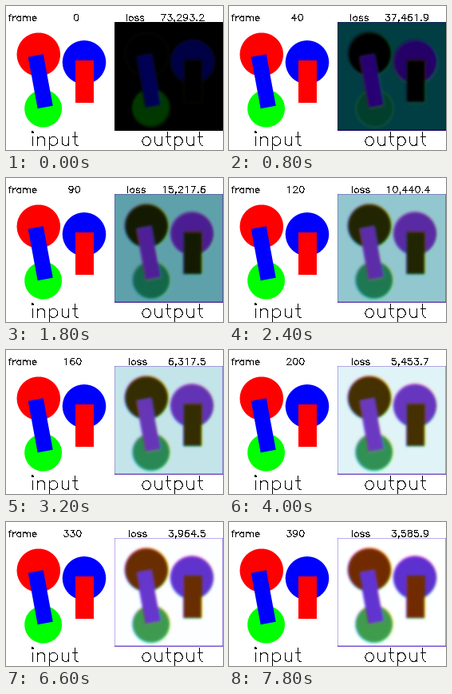
These frames come from a looping animation (272x180 px, 8000 ms). A matplotlib script:

```python
import numpy as np
import matplotlib.pyplot as plt
from matplotlib.animation import FuncAnimation

W, H, SIDE, TOP = 272, 180, 136, 20
FRAMES, STEP_MS = 40, 200


# ---- single-stroke lettering: baseline 0, capitals 21, lower case 14 ----
def arc(cx, cy, rx, ry, a0=0, a1=360):
    t = np.radians(np.linspace(a0, a1, max(5, int(abs(a1 - a0) / 22.5) + 1)))
    return [(cx + rx * np.cos(a), cy + ry * np.sin(a)) for a in t]


def turn(strokes, w, h):
    return [[(w - x, h - y) for x, y in s] for s in strokes]


def hump(dx=0):
    return arc(9.5 + dx, 9, 5.5, 5, 165, 0) + [(15 + dx, 0)]


stem = [(4, 14), (4, 0)]
bar = [(2, 14), (9, 14)]
dot = arc(5, 1, 1, 1)
six = [arc(11.5, 10.5, 7.5, 10.5, 55, 180) + [(4, 7)], arc(10.5, 6.5, 6.5, 6.5)]

GLYPHS = {
    " ": (16, []),
    ".": (10, [dot]),
    ",": (10, [dot, [(6, 1), (4, -4)]]),
    "0": (20, [arc(10, 10.5, 7, 10.5)]),
    "1": (20, [[(6, 17), (11, 21), (11, 0)]]),
    "2": (20, [arc(10, 15, 6, 6, 170, -20) + [(3, 0), (17, 0)]]),
    "3": (20, [[(5, 21), (16, 21), (10, 13)] + arc(10, 6.5, 7, 6.5, 80, -158)]),
    "4": (20, [[(13, 0), (13, 21), (3, 7), (18, 7)]]),
    "5": (20, [[(15, 21), (5, 21), (4, 12)] + arc(10, 7, 7, 7, 130, -155)]),
    "6": (20, six),
    "7": (20, [[(3, 21), (17, 21), (7, 0)]]),
    "8": (20, [arc(10, 16.5, 6, 4.5), arc(10, 6, 7, 6)]),
    "9": (20, turn(six, 20, 21)),
    "a": (19, [[(15, 14), (15, 0)], arc(9.5, 7, 6.5, 7, 35, 325)]),
    "e": (18, [[(3, 8), (15, 8)] + arc(9, 7, 6, 7, 25, 325)]),
    "f": (12, [arc(10, 16, 5, 5, 90, 180) + [(5, 0)], bar]),
    "i": (8, [arc(4, 21, 1, 1), stem]),
    "l": (8, [[(4, 21), (4, 0)]]),
    "m": (30, [stem, hump(), hump(11)]),
    "n": (19, [stem, hump()]),
    "o": (19, [arc(9.5, 7, 6.5, 7)]),
    "p": (19, [[(4, 14), (4, -7)], arc(9.5, 7, 6.5, 7, 145, -145)]),
    "r": (13, [stem, arc(12, 7, 8, 7, 172, 90)]),
    "s": (17, [arc(8.5, 10.6, 5.5, 3.4, 20, 270) + arc(8.5, 3.6, 5.5, 3.6, 90, -160)]),
    "t": (12, [[(5, 21)] + arc(10, 5, 5, 5, 180, 270), bar]),
    "u": (19, turn([stem, hump()], 19, 14)),
}


def write(img, text, x, y, size):
    for ch in text:
        width, strokes = GLYPHS[ch]
        for s in strokes:
            p = np.array(s, float) * (size, -size) + (x, y)
            for a, b in zip(p[:-1], p[1:]):
                n = int(np.ceil(np.abs(b - a).max())) + 1
                q = np.rint(np.linspace(a, b, n + 1)).astype(int)
                q = q[(q[:, 0] >= 0) & (q[:, 0] < W) & (q[:, 1] >= 0) & (q[:, 1] < H)]
                img[q[:, 1], q[:, 0]] = 0
        x += width * size


# ---- scene: coverage of each region over one panel ----
BG, RED, GREEN, DISC, BLOCK = range(5)
SUB = 4
yy, xx = (np.mgrid[:SIDE * SUB, :SIDE * SUB] + 0.5) / SUB
yy += TOP


def disc(cx, cy, r):
    return (xx - cx) ** 2 + (yy - cy) ** 2 <= r * r


def box(cx, cy, hw, hh, deg=0):
    c, s = np.cos(np.radians(deg)), np.sin(np.radians(deg))
    u, v = (xx - cx) * c - (yy - cy) * s, (xx - cx) * s + (yy - cy) * c
    return (abs(u) <= hw) & (abs(v) <= hh)


cover = np.zeros((5, SIDE, SIDE))
cover[BG] = 1
for region, shape in ((RED, disc(40.8, 60.6, 27.2)), (GREEN, disc(46.6, 128.2, 23.4)),
                      (DISC, disc(98, 70.3, 27.2)), (BLOCK, box(43.2, 94.2, 9.7, 32.8, 10.5)),
                      (RED, box(98.5, 94.5, 11.5, 26.5))):
    alpha = shape.reshape(SIDE, SUB, SIDE, SUB).mean((1, 3))
    cover *= 1 - alpha
    cover[region] += alpha

pure = 255 * np.array([(1, 1, 1), (1, 0, 0), (0, 1, 0), (0, 0, 1), (0, 0, 1)])
clean = np.rint(np.tensordot(cover, pure, (0, 0))).astype(np.uint8)


def blur(m, sigma=1.6, r=5):
    k = np.exp(-np.arange(-r, r + 1) ** 2 / (2 * sigma ** 2))
    k /= k.sum()
    m = np.pad(m, r, mode="edge")
    for axis in (0, 1):
        m = np.apply_along_axis(np.convolve, axis, m, k, "valid")
    return m


soft = np.stack([blur(m) for m in cover])
# the colour channels are slightly out of register
layers = [np.roll(soft, s, axis=(1, 2)) for s in ((0, -1), (-1, -1), (-1, 0))]
rim = 1 - (soft ** 2).sum(0)


# ---- training progress ----
def rise(t, top, delay, tau, drift=0, start=0):
    """Delayed saturating growth towards a level that drifts slowly."""
    return start + (top + drift * t) * (1 - np.exp(-(max(t - delay, 0) / tau) ** 1.3))


def violet(t, gain, start):
    return (gain * rise(t, 122, 0, 8.6, -0.75), gain * rise(t, 66, 4, 7, -0.45),
            rise(t, 193 - start, 0, 9.5, 0.4, start))


def tones(t):
    return np.array([
        (rise(t, 255, 4, 9), rise(t, 255, 1, 8), rise(t, 255, 1, 7.4)),
        (rise(t, 130, 4, 20), rise(t, 58, 4, 7, -0.38), 1),
        (rise(t, 65, 3, 13), rise(t, 92, 3, 8.2, 0.2, 56), rise(t, 92, 0, 5.5, -0.4)),
        violet(t, 1, 68),
        violet(t, 1.05, 84),
    ])


def loss_at(t):
    keys = {0: 73293.2, 4: 37461.9, 9: 15217.6, 16: 6317.5, 25: 4538.1, 33: 3964.5, 39: 3585.9}
    return np.exp(np.interp(t, list(keys), np.log(list(keys.values()))))


def output(t):
    hues = tones(t)
    img = np.stack([np.tensordot(hues[:, c], layers[c], 1) for c in range(3)], -1)
    fade = min(1, t / 4)
    img += rim[..., None] * np.array([18, 28, 0]) * (0.3 + 0.7 * fade) * np.exp(-t / 20)
    # darker seams along the border
    for part, mix in ((np.s_[-1, :], 0.85), (np.s_[-2, :], 0.4), (np.s_[:, -1], 0.5),
                      (np.s_[0, :], 0.4), (np.s_[:, 0], 0.4)):
        img[part] += (hues[DISC] - img[part]) * mix * fade
    return np.clip(np.rint(img), 0, 255).astype(np.uint8)


base = np.full((H, W, 3), 255, np.uint8)
base[TOP:TOP + SIDE, :SIDE] = clean
write(base, "  input      output", 4, 174, 0.8)


def render(t):
    img = base.copy()
    img[TOP:TOP + SIDE, SIDE:] = output(t)
    write(img, f"frame{t * 10:8d}         loss{loss_at(t):11,.1f}", 2, 18, 0.4)
    return img


fig = plt.figure(figsize=(W / 100, H / 100), dpi=100, facecolor="white")
ax = fig.add_axes([0, 0, 1, 1])
ax.axis("off")
view = ax.imshow(render(0), interpolation="nearest", aspect="auto")


def update(t):
    view.set_data(render(t))
    return [view]


anim = FuncAnimation(fig, update, frames=FRAMES, interval=STEP_MS, repeat=True,
                     repeat_delay=0, blit=False)
plt.show()
```
